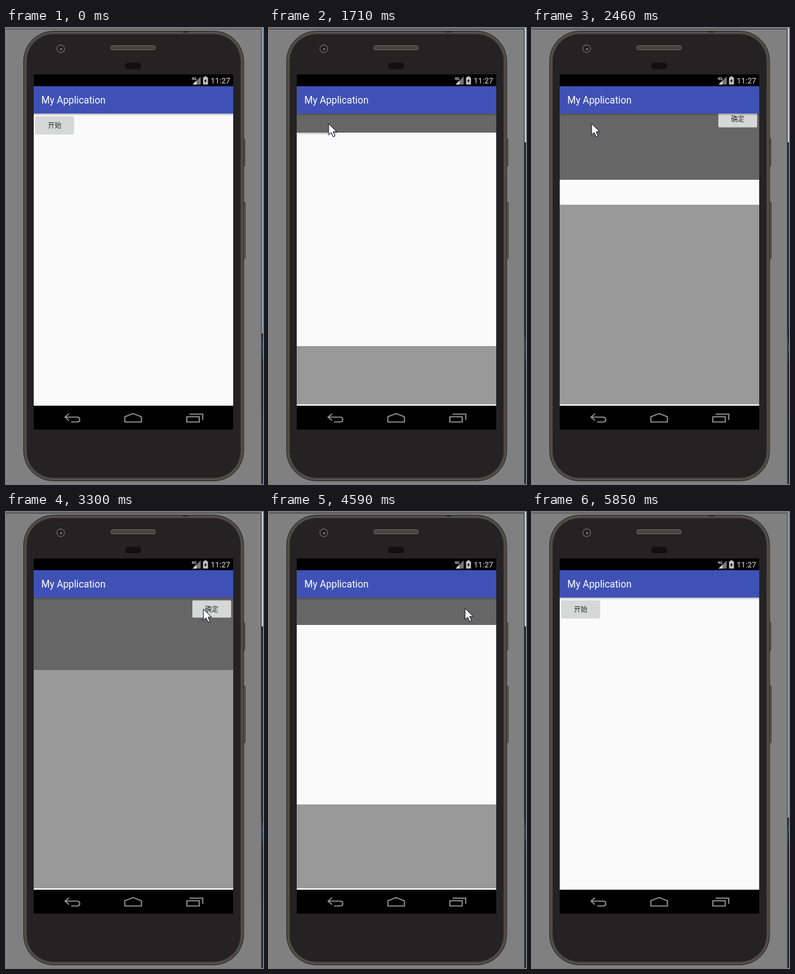
Write an HTML page that moves like this. It is 371 by 658 pixels and loops after 5940 ms.

```html
<!DOCTYPE html>
<html lang="en">
<head>
<meta charset="utf-8">
<title>Sliding panels</title>
<style>
  html, body { margin: 0; height: 100%; overflow: hidden; background: #808080; }
  svg { display: block; width: 100vw; height: 100vh; }
  text { font-family: Roboto, "Noto Sans CJK SC", "Noto Sans CJK", sans-serif; }
  .label { font-size: 9.7px; fill: #2a2a2a; text-anchor: middle; }
  .nav { fill: none; stroke: #999; stroke-width: 1.6; }
</style>
</head>
<body>
<svg viewBox="0 0 371 658">
  <defs>
    <clipPath id="content"><rect x="40" y="123" width="288" height="420"/></clipPath>
    <linearGradient id="shade" x2="0" y2="1">
      <stop stop-color="#000" stop-opacity=".25"/>
      <stop offset="1" stop-color="#000" stop-opacity="0"/>
    </linearGradient>
    <linearGradient id="edge" x2="0" y2="1">
      <stop stop-color="#16202c"/>
      <stop offset=".08" stop-color="#2f4656"/>
      <stop offset=".2" stop-color="#1b2530"/>
      <stop offset="1" stop-color="#242c35"/>
    </linearGradient>
    <g id="button">
      <rect x=".3" y="1" width="55.4" height="25" rx="1.5" fill="#000" opacity=".16"/>
      <rect width="56" height="25" rx="1.5" fill="#d6d7d7"/>
    </g>
  </defs>

  <!-- desktop window -->
  <rect width="371" height="658" fill="#808080"/>
  <path d="M0 1.5H368.5V658" fill="none" stroke="#484b50"/>
  <rect x="369" width="2" height="441" fill="#8b99a9"/>
  <rect x="369" y="441" width="2" height="217" fill="url(#edge)"/>
  <g id="focus">
    <path d="M0 1.5H368.5V441" fill="none" stroke="#30343a"/>
    <rect x="369" width="2" height="165" fill="#c3ccd8"/>
    <rect x="369" y="165" width="2" height="276" fill="#262c34"/>
  </g>

  <!-- phone -->
  <g fill="#5a5652" stroke="#3a3734" stroke-width=".7">
    <rect x="342" y="159.5" width="3" height="40" rx="1"/>
    <rect x="342" y="251" width="3.5" height="82" rx="1"/>
  </g>
  <rect x="25.5" y="4.5" width="317.5" height="649" rx="43" fill="#4a4541" stroke="#2e2b29"/>
  <rect x="27.5" y="6.5" width="313.5" height="645" rx="41" fill="none" stroke="#5f5a55"/>
  <rect x="29.5" y="8.5" width="309.5" height="641" rx="39" fill="#252223" stroke="#55504b" stroke-width=".7"/>
  <rect x="255" y="4.5" width="8" height="2" fill="#2b2825"/>
  <circle cx="79" cy="30" r="5.5" fill="#1f1c1d" stroke="#676462" stroke-width="1.3"/>
  <circle cx="79.5" cy="30.5" r="1.8" fill="#6d6a69"/>
  <rect x="151.5" y="25.5" width="64" height="6" rx="2.5" fill="#464342" stroke="#68645f"/>
  <rect x="172" y="50" width="23" height="9.5" rx="4.5" fill="#120f10"/>
  <rect x="40" y="67" width="288" height="512.5"/>

  <!-- status bar -->
  <text x="268" y="74.5" font-size="5.5" font-weight="700" fill="#ddd">4G</text>
  <path d="M281 70V81.5H269.5Z" fill="#777"/>
  <path d="M275 76V81.5H269.5Z" fill="#ddd"/>
  <path d="M284.5 71.2H286.5V69.8H289.5V71.2H291.5V81.5H284.5Z" fill="#ccc"/>
  <path d="M288.7 72.5L286 77H287.7L287.2 80L290 75.7H288.3Z"/>
  <text x="295.5" y="80" font-size="11.3" fill="#e0e0e0">11:27</text>

  <!-- app -->
  <rect x="40" y="123" width="288" height="422" fill="#fafafa"/>
  <use href="#button" x="42.3" y="127.5"/>
  <text class="label" x="70.3" y="144">开始</text>
  <g clip-path="url(#content)">
    <g id="upper">
      <rect x="40" y="123" width="288" height="105" fill="#666"/>
      <use href="#button" x="269" y="127.5"/>
      <text class="label" x="297" y="144">确定</text>
    </g>
    <rect id="lower" x="40" y="228" width="288" height="316" fill="#999"/>
  </g>
  <rect x="40" y="123" width="288" height="4" fill="url(#shade)"/>
  <rect x="40" y="84" width="288" height="39.5" fill="#3f51b5"/>
  <text x="51" y="109" font-size="14" fill="#fff">My Application</text>

  <!-- navigation bar -->
  <path class="nav" d="M91 556.5L85.3 561.5L91 566.5M85.5 561.5H102.5Q106.5 561.5 106.5 565T102.5 568.5H94"/>
  <path class="nav" d="M171.5 568.5V561L183.5 556.3L195.5 561V568.5Z"/>
  <path class="nav" d="M261 561H279V568.5H261ZM265 557.3H284V565.5"/>

  <path id="cursor" d="M0 0V16.3L3.8 12.8L6.6 19L9.4 17.8L6.7 11.8H11.8Z" fill="#fff" stroke="#15152e" stroke-width="1"/>
</svg>
<script>
const LOOP = 5940, SLIDE = 1755, TRAVEL = 1.1;
const [focusEdge, upper, lower, cursor] =
  ["focus", "upper", "lower", "cursor"].map(id => document.getElementById(id));

const progress = (t, start, length) => Math.min(1, Math.max(0, (t - start) / length));
const easeInOut = p => (1 - Math.cos(Math.PI * p)) / 2;
const easeOut = p => 1 - (1 - p) ** 2;
const mix = (a, b, p) => a + (b - a) * p;
const move = (el, x, y) => el.setAttribute("transform", `translate(${Math.round(x)} ${Math.round(y)})`);
const show = (el, on) => el.setAttribute("visibility", on ? "visible" : "hidden");

function cursorAt(t) {
  if (t < 2760) {
    const p = easeOut(progress(t, 150, 480));
    return [mix(327, 86, p), mix(53, 138, p)];
  }
  if (t < 4350) {
    const p = progress(t, 2760, 540);
    return [mix(86, 285, easeOut(p)), mix(138, 140, p) + 7 * Math.sin(Math.PI * p)];
  }
  const p = progress(t, 5325, 195) ** 1.6;
  return [mix(283, 371, p), mix(139, 61, p)];
}

function draw(now) {
  const t = now % LOOP;
  // 1 = panels fully apart; slightly more than 1 keeps them out of sight
  const gap = TRAVEL * (1 - easeInOut(progress(t, 1020, SLIDE)) + easeInOut(progress(t, 3648, SLIDE)));
  move(upper, 0, -105 * gap);
  move(lower, 0, 316 * gap);
  move(cursor, ...cursorAt(t));
  show(cursor, t >= 150 && t < 5520);
  show(focusEdge, t >= 810 && t < 5850);
  requestAnimationFrame(draw);
}
requestAnimationFrame(draw);
</script>
</body>
</html>
```
